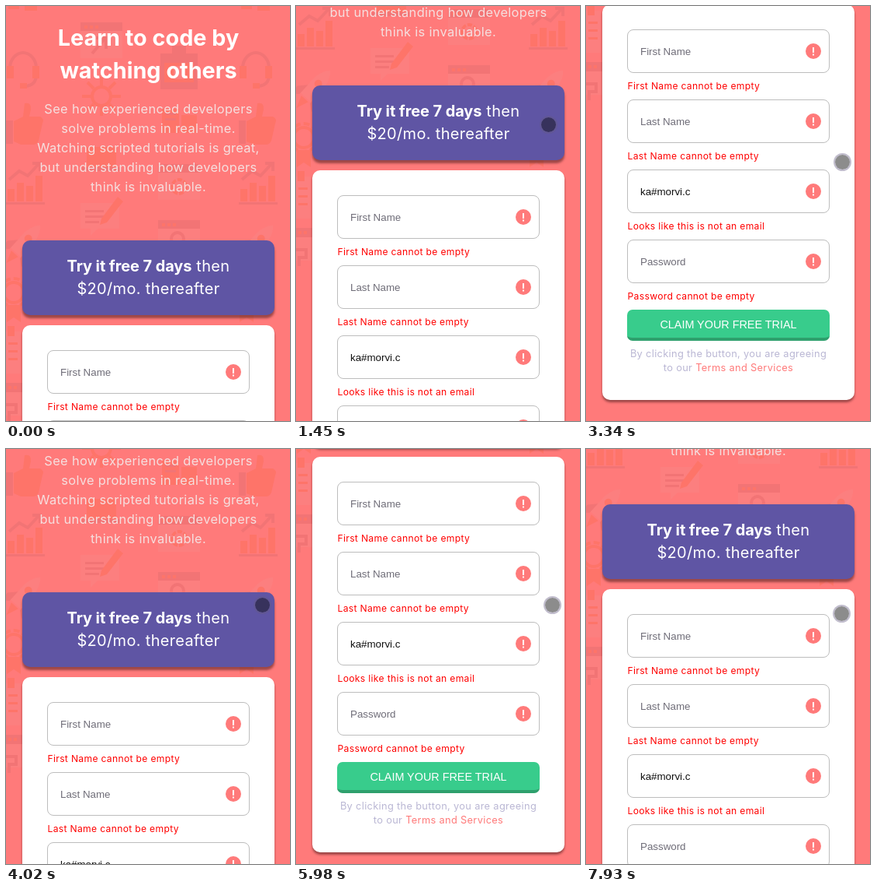
Write an HTML page that moves like this. It is 366 px wide and 533 px high and loops after 8 s.

```html
<!DOCTYPE html>
<html lang="en">
<head>
<meta charset="utf-8">
<title>Sign-up form</title>
<style>
  * { box-sizing: border-box; margin: 0; }
  html, body { width: 100%; height: 100%; overflow: hidden; background: #ff7a7a; }
  body { position: relative; font-family: Inter, sans-serif; letter-spacing: .021em; }
  #page { position: absolute; left: 0; top: 0; width: 366px; height: 945px; }
  #page > *, .card > * { position: absolute; white-space: nowrap; }
  .art { left: 0; top: 0; }
  h1, .intro { left: 0; width: 367px; text-align: center; }
  h1 { top: 20px; font-size: 28.8px; line-height: 42px; letter-spacing: 0; color: #fff; }
  .intro { top: 120px; font-size: 16.4px; line-height: 25px; color: #f5dfdf; }
  .offer, .card { left: 21px; width: 325px; border-radius: 10px; }
  .offer {
    top: 301px; height: 96px; padding-top: 19px; text-align: center;
    font-size: 20px; line-height: 29px; letter-spacing: .016em; color: #fff;
    background: #5f55a4; box-shadow: 0 4px 3px rgba(60, 20, 20, .5);
  }
  .offer b { letter-spacing: -.005em; }
  .card { top: 410px; height: 508px; background: #fff; box-shadow: 0 3px 3px rgba(60, 20, 20, .5); }
  .field {
    left: 32px; width: 261px; height: 56px; padding-left: 16px;
    border: 1px solid #bdbdbd; border-radius: 8px;
    font: 13.333px/55px "Liberation Sans", Arial, sans-serif; letter-spacing: 0; color: #6f6d78;
  }
  .field.filled { color: #111; }
  .field svg { position: absolute; left: 229px; top: 17px; }
  .error { left: 32.5px; font-size: 12.1px; line-height: 18px; color: #f00; }
  .button {
    left: 32px; top: 392px; width: 261px; height: 40px; text-align: center;
    border-radius: 7px; border-bottom: 4px solid #2ea06d; background: #38cc8c;
    font: 14.4px/38px "Liberation Sans", Arial, sans-serif; letter-spacing: 0; color: #fff;
  }
  .terms { left: 0; top: 440px; width: 325px; text-align: center; font-size: 12.8px; line-height: 18px; color: #bab7d4; }
  .terms span { color: #ff7a7a; }
  #touch {
    position: absolute; left: -11.5px; top: -11.5px; width: 23px; height: 23px;
    border-radius: 50%; background: rgba(12, 12, 12, .47); background-clip: padding-box;
    border: 2px solid rgba(100, 90, 130, .4);
  }
  .o { fill: #fe7469; }
  .d { fill: #f27475; }
  .l { fill: #fc7f7f; }
  .so, .sd { fill: none; stroke-width: 4; }
  .so { stroke: #fe7469; }
  .sd { stroke: #f27475; }
</style>
</head>
<body>
<div id="page">
  <svg class="art" width="350" height="533">
    <defs>
      <g id="window">
        <path class="l" d="M0 0h54v46H0z"/>
        <path class="d" d="M0 0h54v11H0z"/>
        <path class="o" d="M5 4h4v4H5zM12 4h4v4h-4zM19 4h4v4h-4z"/>
      </g>
      <pattern id="icons" width="300" height="533" patternUnits="userSpaceOnUse">
        <path class="o" d="M3 0h14v4H3zM24 0h16v6H24z"/>
        <g transform="translate(22 80)">
          <path class="sd" d="M-17 0a17 20 0 0 1 34 0M17 8q0 14-14 15"/>
          <path class="o" d="M-21-3h9v16h-9zM12-3h9v16h-9zM-4 19h9v7h-9z"/>
        </g>
        <g transform="translate(22 150)">
          <path class="o" d="M-12-2 0-8 2-25q9-2 8 8l-2 9h14q6 3 3 9l-5 22q-2 5-7 5h-16l-9-4z"/>
          <path class="d" d="M-24-3h11v30h-11z"/>
        </g>
        <g transform="translate(0 196)">
          <path class="o" d="M2 39h9v16H2zM14 31h9v24h-9zM26 35h9v20h-9zM38 22h9v33h-9z"/>
          <path class="sd" stroke-width="2" d="M4 27 17 16l11 6L43 6M34 6h10v10"/>
          <path class="d" d="M0 56h50v3H0z"/>
        </g>
        <g transform="translate(24 304) rotate(42)">
          <path class="l" d="M-9 17V-8q1-14 9-22 8 8 9 22v25z"/>
          <path class="d" d="M-9 3-18 13v13l9-7zM9 3 18 13v13l-9-7z"/>
          <path class="o" d="M-6 19H6L0 35z"/>
          <circle class="o" cy="-7" r="5"/>
        </g>
        <g transform="translate(10 368)">
          <circle class="so" r="18" stroke-width="6" stroke-dasharray="8 4"/>
          <circle class="so" r="13"/>
          <path class="o" d="M-9 16H9v22l-9-6-9 6z"/>
        </g>
        <path class="l" d="M0 418h19v54H0z"/>
        <path class="o" d="M2 411h9v13H2zM3 432h12v3H3zM3 442h12v3H3zM3 452h12v3H3z"/>
        <path class="d" d="M0 484h22v12H0zM297 484h3v12h-3z"/>
        <path class="o" d="M3 488h4v4H3zM10 488h4v4h-4z"/>
        <path class="l" d="M0 496h22v30H0z"/>
        <path class="sd" d="M0 512h13v10H4v11"/>
        <use href="#window" x="96" y="21"/>
        <path class="sd" d="M111 61l17-20m-12 0h13v14"/>
        <g transform="translate(123 116)">
          <circle class="so" r="12"/>
          <path class="so" d="M0-25v12M0 13v12M-25 0h12M13 0h12M-18-18l8 8M10 10l8 8M18-18l-8 8M-10 10l-8 8" stroke-width="3"/>
        </g>
        <path class="o" d="M104 181h38v26h-38z"/>
        <path class="d" d="M98 207h50v5H98z"/>
        <path class="l" d="M96 253h50v33h-28l-9 9v-9H96z"/>
        <path class="d" d="M102 262h24v3h-24zM102 269h30v3h-30zM102 276h18v3h-18z"/>
        <path class="o" d="m123 273 21-28 7 6-21 27-9 3z"/>
        <path class="d" d="M199 61h48v46h-48zM214 51h18v10h-18z"/>
        <path class="o" d="M204 73h38v25h-38z"/>
        <path class="l" d="M216 77h14v17h-14z"/>
        <path class="o" d="M201 132h22v31h-22zM226 140h20v23h-20z"/>
        <path class="d" d="M205 137h14v3h-14zM205 144h14v3h-14z"/>
        <use href="#window" x="196" y="203"/>
        <circle class="so" cx="223" cy="232" r="9" stroke-dasharray="6 2"/>
        <use href="#window" x="196" y="275"/>
        <circle class="sd" cx="221" cy="299" r="8"/>
      </pattern>
    </defs>
    <rect width="350" height="533" fill="url(#icons)"/>
  </svg>
  <h1>Learn to code by<br>watching others</h1>
  <p class="intro">See how experienced developers<br>solve problems in real-time.<br>Watching scripted tutorials is great,<br>but understanding how developers<br>think is invaluable.</p>
  <div class="offer"><b>Try it free 7 days</b> then<br>$20/mo. thereafter</div>
  <div class="card" id="card">
    <div class="button">CLAIM YOUR FREE TRIAL</div>
    <p class="terms">By clicking the button, you are agreeing<br>to our <span>Terms and Services</span></p>
  </div>
</div>
<div id="touch"></div>
<script>
  const LOOP = 8000;
  const byId = id => document.getElementById(id);

  const fields = [
    ['First Name', 'First Name cannot be empty'],
    ['Last Name', 'Last Name cannot be empty'],
    ['ka#morvi.c', 'Looks like this is not an email', 'filled'],
    ['Password', 'Password cannot be empty']
  ];
  const alertIcon = `<svg width="20" height="20"><circle cx="10" cy="10" r="10" fill="#ff7a7a"/>
    <path d="M9 5h2v7H9zM9 13.5h2v2H9z" fill="#fff"/></svg>`;
  byId('card').insertAdjacentHTML('afterbegin', fields.map(([text, error, state = ''], i) => `
    <div class="field ${state}" style="top:${32 + 90 * i}px">${text}${alertIcon}</div>
    <p class="error" style="top:${96 + 90 * i}px">${error}</p>`).join(''));

  const linear = p => p;
  const easeIn = p => p ** 1.25;
  const easeOut = p => 1 - (1 - p) ** 2;
  const smooth = p => p * p * (3 - 2 * p);

  // Each move: first step, last step, number of steps, from, to, easing
  const scrolls = [
    [1030, 1450, 7, 6, 199, easeIn],
    [1520, 1790, 4, 236, 345, linear],
    [1860, 2210, 6, 362, 412, easeOut],
    [3340, 4020, 10, 412, 117, smooth],
    [4280, 4490, 4, 108, 0, smooth],
    [5410, 5980, 9, 6, 400, smooth],
    [6440, 6580, 3, 404, 412, linear],
    [7580, 7930, 6, 412, 230, smooth]
  ];
  const touches = [
    [410, 680, 5, [339, 498], [321, 138], smooth],
    [750, 820, 2, [323, 145], [325, 152], linear],
    [1860, 2210, 6, [326, 154], [326, 171], smooth],
    [2810, 3080, 5, [326, 174], [330, 200], smooth],
    [6910, 7050, 3, [330, 203], [329, 211], linear]
  ];

  const mix = (a, b, p) => Array.isArray(a) ? a.map((v, i) => mix(v, b[i], p)) : a + (b - a) * p;

  function play(el, start, moves, style) {
    const frames = [{ offset: 0, easing: 'step-end', ...start }];
    for (const [t0, t1, count, from, to, ease] of moves) {
      for (let k = 0; k < count; k++) {
        const p = k / (count - 1);
        frames.push({ offset: mix(t0, t1, p) / LOOP, easing: 'step-end', ...style(mix(from, to, ease(p))) });
      }
    }
    frames.push({ ...frames[frames.length - 1], offset: 1 });
    el.animate(frames, { duration: LOOP, iterations: Infinity });
  }

  const scrollTo = y => ({ transform: `translateY(${-Math.round(y)}px)` });
  const touchAt = ([x, y]) => ({ opacity: 1, transform: `translate(${x}px, ${y}px)` });

  play(byId('page'), scrollTo(0), scrolls, scrollTo);
  play(byId('touch'), { ...touchAt([339, 498]), opacity: 0 }, touches, touchAt);
</script>
</body>
</html>
```
